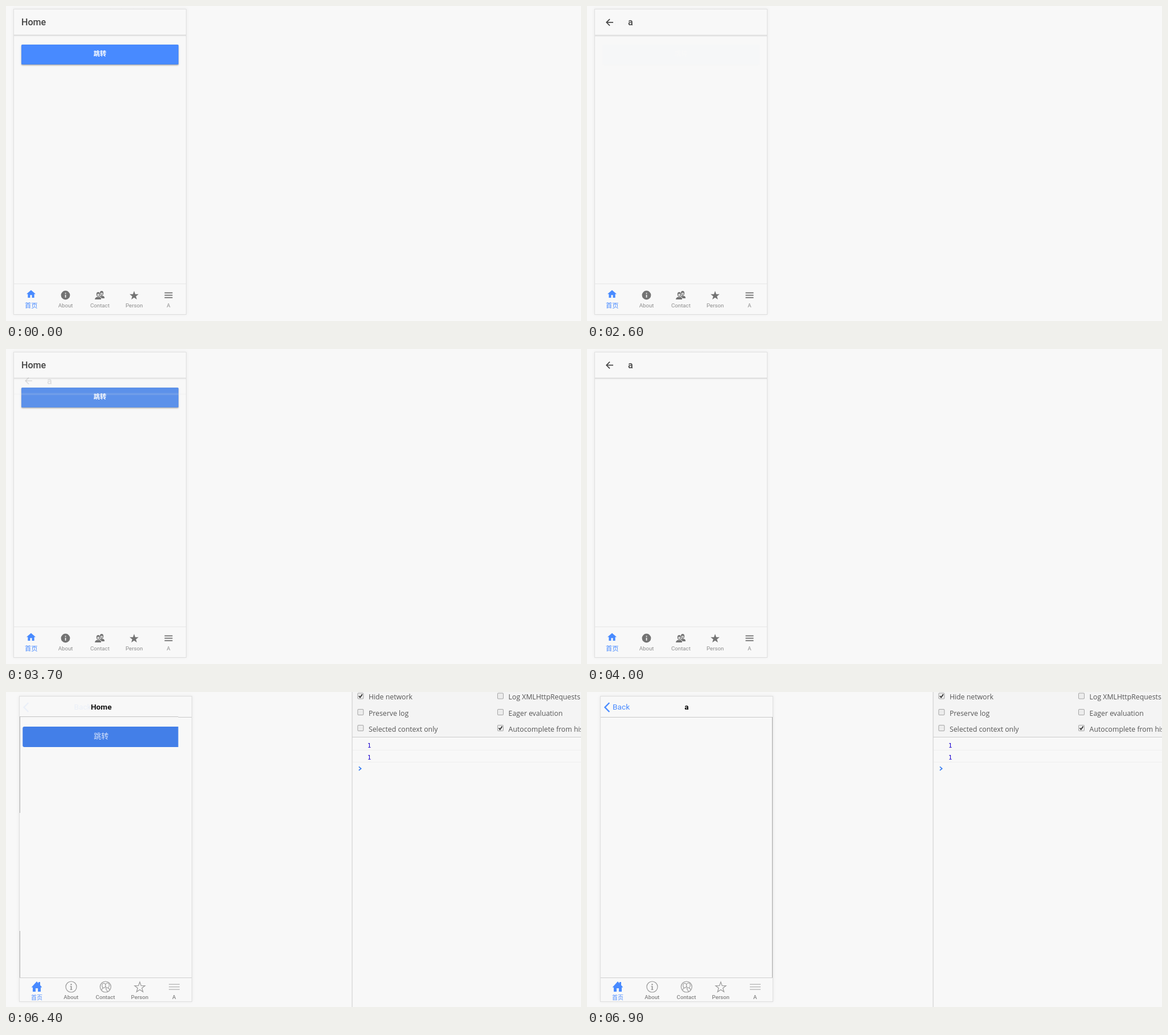
Write an HTML page with a canvas that moves like this. It is 1010 px wide and 555 px high and loops after 8000 ms.

```html
<!DOCTYPE html>
<html lang="en">
<head>
<meta charset="utf-8">
<title>Page transitions</title>
<style>
html, body { margin: 0; width: 100%; height: 100%; overflow: hidden; background: #f8f8f8; }
canvas { display: block; }
</style>
</head>
<body>
<canvas id="stage" width="1010" height="555"></canvas>
<script>
const ctx = document.getElementById('stage').getContext('2d');
const LOOP = 8000, STEP = 100, SCALE = 0.807;
const BG = '#f8f8f8', BLUE = '#488aff', PRESSED = '#427fe8';
const SANS = 'Roboto, "Noto Sans CJK SC", "Noto Sans CJK", sans-serif';
const UI = '"Open Sans", "Noto Sans", sans-serif';
const MONO = '"DejaVu Sans Mono", monospace';
const TABS = ['首页', 'About', 'Contact', 'Person', 'A'];

function bezier(x1, y1, x2, y2) {
  const at = (a, b, s) => 3 * (1 - s) ** 2 * s * a + 3 * (1 - s) * s * s * b + s ** 3;
  return x => {
    if (x <= 0) return 0;
    if (x >= 1) return 1;
    let lo = 0, hi = 1;
    for (let i = 0; i < 30; i++) {
      const mid = (lo + hi) / 2;
      if (at(x1, x2, mid) < x) lo = mid; else hi = mid;
    }
    return at(y1, y2, lo);
  };
}
const easeEnter = bezier(0.36, 0.66, 0.04, 1);
const easeLeave = bezier(0.47, 0, 0.745, 0.715);

function rect(x, y, w, h, color) {
  ctx.fillStyle = color;
  ctx.fillRect(x, y, w, h);
}
function text(str, x, y, font, color, align = 'left') {
  ctx.font = font;
  ctx.fillStyle = color;
  ctx.textAlign = align;
  ctx.fillText(str, x, y);
}
function line(points, color, width, close) {
  ctx.beginPath();
  points.forEach(([x, y]) => ctx.lineTo(x, y));
  if (close) ctx.closePath();
  ctx.strokeStyle = color;
  ctx.lineWidth = width;
  ctx.stroke();
}
function circle(x, y, r, color, width) {
  ctx.beginPath();
  ctx.arc(x, y, r, 0, Math.PI * 2);
  if (width) {
    ctx.strokeStyle = color;
    ctx.lineWidth = width;
    ctx.stroke();
  } else {
    ctx.fillStyle = color;
    ctx.fill();
  }
}
function roundRect(x, y, w, h, r, color) {
  ctx.beginPath();
  ctx.roundRect(x, y, w, h, r);
  ctx.fillStyle = color;
  ctx.fill();
}
function shape(d, x, y, scale, color) {
  ctx.save();
  ctx.translate(x, y);
  ctx.scale(scale, scale);
  ctx.fillStyle = color;
  ctx.fill(new Path2D(d), 'evenodd');
  ctx.restore();
}
function starPoints(x, y, outer, inner) {
  return Array.from({ length: 10 }, (_, i) => {
    const a = -Math.PI / 2 + i * Math.PI / 5, r = i % 2 ? inner : outer;
    return [x + r * Math.cos(a), y + r * Math.sin(a)];
  });
}
function layer(alpha, dx, dy, draw) {
  ctx.save();
  ctx.globalAlpha *= alpha;
  ctx.translate(dx, dy);
  draw();
  ctx.restore();
}
function clipTo(x, y, w, h, draw) {
  ctx.save();
  ctx.beginPath();
  ctx.rect(x, y, w, h);
  ctx.clip();
  draw();
  ctx.restore();
}
function phoneFrame(x, y, dash) {
  ctx.save();
  ctx.shadowColor = 'rgba(0,0,0,0.07)';
  ctx.shadowBlur = 6;
  rect(x, y, 304, 538, BG);
  ctx.restore();
  ctx.save();
  ctx.setLineDash(dash);
  ctx.strokeStyle = dash.length ? '#c9c9c9' : '#dedede';
  ctx.lineWidth = 1;
  ctx.strokeRect(x + 0.5, y + 0.5, 303, 538);
  ctx.restore();
}

// Material pages

function materialHeader() {
  rect(14, 50, 302, 1, '#ececec');
  rect(14, 51, 302, 1.5, '#d9d9d9');
  rect(14, 52.5, 302, 1, '#eeeeee');
}
function materialHome(pressed) {
  materialHeader();
  text('Home', 27, 34, `500 16.1px ${SANS}`, '#424242');
  ctx.save();
  ctx.shadowColor = 'rgba(0,0,0,0.4)';
  ctx.shadowBlur = 2.5;
  ctx.shadowOffsetY = 1.3;
  roundRect(27, 68, 276, 35, 1.6, pressed ? PRESSED : BLUE);
  ctx.restore();
  text('跳转', 165, 88, `bold 11.3px ${SANS}`, '#fff', 'center');
}
function materialDetail() {
  rect(14, 6, 302, 483, BG);
  materialHeader();
  line([[46, 28.5], [34.5, 28.5]], '#424242', 1.7);
  line([[40, 22.7], [34.2, 28.5], [40, 34.3]], '#424242', 1.7);
  text('a', 72, 34, `500 16.1px ${SANS}`, '#424242');
}
function person(x, y) {
  ctx.beginPath();
  ctx.ellipse(x, y, 3.2, 4, 0, 0, Math.PI * 2);
  ctx.moveTo(x - 6, y + 9);
  ctx.quadraticCurveTo(x - 5.5, y + 5.5, x - 1.5, y + 4.6);
  ctx.lineTo(x + 1.5, y + 4.6);
  ctx.quadraticCurveTo(x + 5.5, y + 5.5, x + 5, y + 9);
  ctx.closePath();
}
function materialTabs() {
  const gray = '#737373';
  rect(14, 489, 302, 1, '#e6e6e6');
  shape('M10 20v-6h4v6h5v-8h3L12 3 2 12h3v8z', 34.4, 498, 0.8, BLUE);
  circle(104.5, 509.5, 7.9, gray);
  rect(103.7, 508.7, 1.7, 5, BG);
  rect(103.7, 505.4, 1.7, 1.7, BG);
  person(168, 506);
  ctx.fillStyle = gray;
  ctx.fill();
  person(162, 508);
  ctx.strokeStyle = BG;
  ctx.lineWidth = 1.6;
  ctx.stroke();
  ctx.fillStyle = gray;
  ctx.fill();
  ctx.beginPath();
  ctx.ellipse(162, 509, 1.8, 2.2, 0, 0, Math.PI * 2);
  ctx.ellipse(168.3, 507, 1.6, 2, 0, 0, Math.PI * 2);
  ctx.fillStyle = '#dddddd';
  ctx.fill();
  ctx.beginPath();
  starPoints(225, 510.4, 8.3, 3.4).forEach(([x, y]) => ctx.lineTo(x, y));
  ctx.fillStyle = gray;
  ctx.fill();
  [504.5, 508.7, 512.9].forEach(y => rect(278.5, y, 14, 1.8, gray));
  TABS.forEach((name, i) => {
    const x = 44.3 + i * 60.3;
    text(name, x, i ? 531.3 : 532, i ? `9.7px ${SANS}` : `500 11.3px ${SANS}`, i ? '#8c8c8c' : BLUE, 'center');
  });
}
function drawMaterial(t) {
  phoneFrame(13, 5, [1, 1]);
  const pushStart = t < 2600 ? 480 : 3680;
  const popping = t >= 2600 && t < 3700;
  const p = popping ? 1 - easeLeave((t - 2580) / 200) : easeEnter((t - pushStart) / 280);
  const pressed = !popping && p > 0;
  clipTo(14, 6, 302, 483, () => {
    materialHome(pressed);
    if (p > 0) layer(p, 0, 40 * SCALE * (1 - p), materialDetail);
  });
  materialTabs();
}

// iOS pages

function iosHome(pressed) {
  rect(-76, 43, 402, 1, '#c4c4c4');
  rect(325, 43, 1, 460, '#b0b0b0');
  roundRect(37, 61, 276, 36, 3, pressed ? '#407de8' : BLUE);
  text('跳转', 175, 82, `500 13px ${SANS}`, pressed ? '#d9e5fb' : '#fff', 'center');
}
function iosDetail() {
  rect(24, 8, 302, 495, BG);
  rect(24, 44, 302, 1, '#c9c9c9');
  rect(325, 44, 1, 459, '#b0b0b0');
}
function iosTabs() {
  const gray = '#999999';
  rect(24, 503, 302, 1, '#cfcfcf');
  shape('M0 10L9 0l3 3.3V1h3v5.6L18 10l-1 1-1-1v8h-5v-6H7v6H2v-8l-1 1z', 45, 510, 1, BLUE);
  circle(114.5, 519.5, 9.5, gray, 1.2);
  rect(113.7, 518, 1.8, 6.5, gray);
  rect(112.5, 518, 2, 1, gray);
  rect(112.5, 524, 4, 1, gray);
  circle(114.5, 515.2, 1.2, gray);
  circle(174.8, 519.5, 9.5, gray, 1.2);
  ctx.beginPath();
  ctx.ellipse(171.8, 517.3, 3, 4, 0, 0, Math.PI * 2);
  ctx.moveTo(181.3, 517);
  ctx.ellipse(178, 517, 3.3, 4.2, 0, 0, Math.PI * 2);
  ctx.moveTo(167.5, 525);
  ctx.quadraticCurveTo(169, 522.8, 171, 521.3);
  ctx.moveTo(176.5, 521);
  ctx.quadraticCurveTo(174.5, 523, 176.5, 524.5);
  ctx.lineTo(178.5, 528);
  ctx.moveTo(179, 521);
  ctx.lineTo(182.5, 524.5);
  ctx.strokeStyle = gray;
  ctx.lineWidth = 1.1;
  ctx.stroke();
  line(starPoints(235, 520.5, 9.6, 3.9), gray, 1.2, true);
  [514.5, 519, 523.5].forEach(y => rect(286, y, 19, 1.1, '#aaaaaa'));
  TABS.forEach((name, i) => {
    const x = 54 + i * 60.3;
    text(name, x, i ? 541.3 : 542, `500 ${i ? 9.7 : 10}px ${SANS}`, i ? '#858585' : BLUE, 'center');
  });
}
function drawIos(t) {
  const p = easeEnter((t - 6380) / 500);
  const pressed = p > 0;
  const titleFont = `600 13.7px ${SANS}`;
  phoneFrame(23, 7, []);
  clipTo(24, 8, 302, 495, () => {
    layer(1 - 0.2 * p, -100 * p, 0, () => iosHome(pressed));
    if (pressed) layer(1, 302 * (1 - p), 0, iosDetail);
    layer(1 - p, -100 * p, 0, () => text('Home', 175, 31, titleFont, '#000', 'center'));
    if (!pressed) return;
    layer(p, 302 * (1 - p), 0, () => text('a', 175, 31, titleFont, '#000', 'center'));
    layer(p, 0, 0, () => line([[39.3, 19], [31.5, 27], [39.3, 35]], BLUE, 2.4));
    layer(p, 100 * SCALE * (1 - p), 0, () => text('Back', 45, 31, `13.7px ${SANS}`, BLUE));
    if (p < 0.1) {
      rect(24, 43, 1, 170, '#b4b4b4');
      rect(24, 421, 1, 82, '#b4b4b4');
    }
  });
  iosTabs();
}

// Developer console

function checkbox(x, y, label, checked) {
  roundRect(x, y, 11, 11, 2, '#a6a6a6');
  roundRect(x + 1, y + 1, 9, 9, 1, '#ececec');
  if (checked) line([[x + 2.5, y + 5.5], [x + 4.7, y + 8], [x + 8.6, y + 2.5]], '#333', 1.8);
  text(label, x + 19.6, y + 11.5, `12.3px ${UI}`, '#555');
}
function drawConsole(t) {
  rect(608, 0, 402, 79, '#f4f4f4');
  rect(608, 79, 402, 1, '#cccccc');
  rect(607.5, 0, 1, 555, '#cacaca');
  [
    ['Hide network', 'Log XMLHttpRequests', true, false],
    ['Preserve log', 'Eager evaluation', false, false],
    ['Selected context only', 'Autocomplete from history', false, true]
  ].forEach(([left, right, leftOn, rightOn], i) => {
    const y = [1.5, 30, 58][i];
    checkbox(617.3, y, left, leftOn);
    checkbox(863, y, right, rightOn);
  });
  const rows = t >= 6400 ? 2 : 0;
  for (let i = 0; i < rows; i++) {
    text('1', 634.8, 98 + i * 21, `11px ${MONO}`, '#1c00cf');
    rect(609, 102 + i * 21, 401, 1, '#efefef');
  }
  const y = 93.5 + rows * 20.7;
  line([[619.8, y - 3.2], [623.6, y], [619.8, y + 3.2]], '#367cf1', 1.7);
}

function render(now) {
  const t = Math.floor((now % LOOP) / STEP) * STEP;
  rect(0, 0, 1010, 555, BG);
  if (t < 4800) {
    drawMaterial(t);
  } else {
    drawIos(t);
    drawConsole(t);
  }
}
let start;
function tick(now) {
  start ??= now;
  render(now - start);
  requestAnimationFrame(tick);
}
render(0);
requestAnimationFrame(tick);
</script>
</body>
</html>
```
